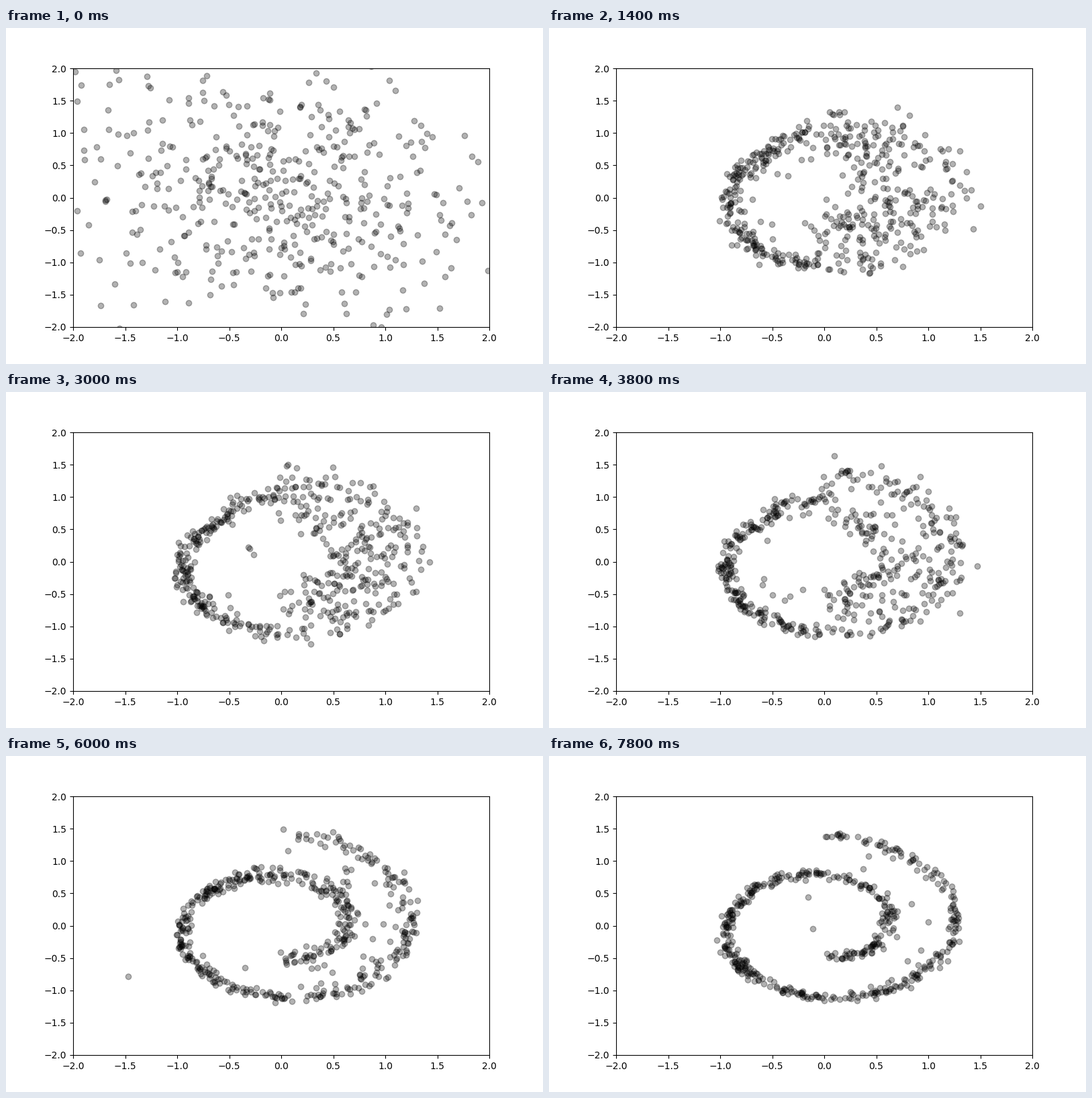
Animation of 800 by 500 pixels, one loop 8 s. Source, as a matplotlib script:

```python
import numpy as np
import matplotlib.pyplot as plt
from matplotlib.animation import FuncAnimation

N, FRAMES, STEP = 500, 40, 200
PI = np.pi
LEFT_SHARE, OUTER_SHARE = .42, .62


def fade(p, start, end):
    """Smoothly falls from 1 to 0 as p goes from start to end."""
    x = np.clip((p - start) / (end - start), 0, 1)
    return 1 - x * x * (3 - 2 * x)


def spiral(t, r):
    return np.column_stack([r * np.cos(t), r * np.sin(t)])


def left_arm(rng, n, p):
    t = rng.uniform(2.5 * PI, 3.5 * PI, n)
    # early on the upper end bends outwards to a root shared by both right arms
    bend = np.clip(1 - (t - 2.5 * PI) / .8, 0, 1)
    r = t / 10 + .3 * fade(p, .3, .75) * bend
    spill = rng.random(n) < .08 * (1 - p) ** 2
    r[spill] *= rng.uniform(.35, .95, spill.sum())
    sigma = (.06 - .025 * p) * (1 + .5 * bend)
    return spiral(t, r), sigma


def right_arms(rng, n, p):
    t = rng.uniform(1.5 * PI, 2.5 * PI, n)
    # v is 0 on the inner arm and 1 on the outer; the cloud between them clears
    outer = rng.random(n) < OUTER_SHARE
    v = np.abs(outer - rng.random(n) ** (1 + 40 * p ** 4))
    depth = .85 * np.clip(1 - p / .7, 0, 1)
    v += depth * (.25 * v - (1 - v) * rng.random(n))
    root = np.clip(1 - (2.5 * PI - t) / .7, 0, 1) * fade(p, .15, .6)
    v += .45 * root * (.5 - v)
    return spiral(t, (t + 2 * PI * v) / 10), np.full(n, .125 - .088 * p)


def sample(k):
    rng = np.random.default_rng(700 + k)
    noise = rng.standard_normal((N, 2))
    if k == 0:
        return noise
    p = k / (FRAMES - 1)
    n_left = int(LEFT_SHARE * N)
    left, s_left = left_arm(rng, n_left, p)
    right, s_right = right_arms(rng, N - n_left, p)
    sigma = np.concatenate([s_left, s_right])[:, None]
    pts = np.vstack([left, right]) + sigma * rng.standard_normal((N, 2))
    # the first steps collapse from pure noise; a few points never settle
    mix = .6 ** k
    pts = (1 - mix) * pts + mix * noise
    stray = rng.random(N) < .004
    pts[stray] = noise[stray]
    return pts


fig, ax = plt.subplots(figsize=(8, 5), dpi=100)
ax.set(xlim=(-2, 2), ylim=(-2, 2))
dots = ax.scatter(*sample(0).T, s=36, c="black", alpha=.3)


def draw(k):
    dots.set_offsets(sample(k))
    return dots,


anim = FuncAnimation(fig, draw, frames=FRAMES, interval=STEP, repeat=True,
                     repeat_delay=0)
plt.show()
```
